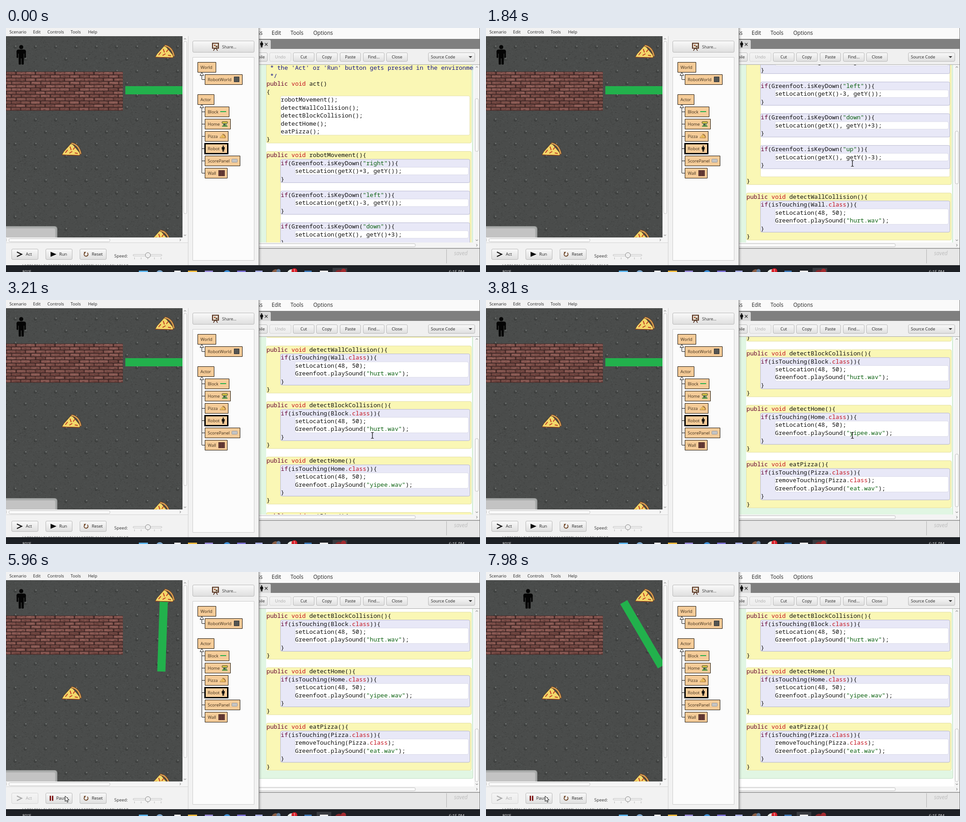
Write an HTML page with a canvas that moves like this. It is 1042x537 px and loops after 8000 ms.

```html
<!DOCTYPE html>
<html lang="en">
<head>
<meta charset="utf-8">
<title>Robot scenario</title>
<style>
html, body { margin: 0; width: 100%; height: 100%; overflow: hidden; background: #f1f1f1; }
canvas { display: block; }
</style>
</head>
<body>
<canvas id="stage" width="1042" height="537"></canvas>
<script>
const W = 1042, H = 537, LOOP = 8000;
const view = document.getElementById('stage').getContext('2d');
const UI = '"Open Sans", "Noto Sans", sans-serif';
const MONO = '500 13.05px "Noto Sans Mono", "DejaVu Sans Mono", monospace';
const CHAR = 7.83, LINE = 17.45;
let g = view;

// ---------- helpers ----------
function rng(seed) {
  return () => {
    seed = (seed * 1664525 + 1013904223) >>> 0;
    return seed / 4294967296;
  };
}
function rect(x, y, w, h, fill) {
  g.fillStyle = fill;
  g.fillRect(x, y, w, h);
}
function box(x, y, w, h, r, fill, stroke, lw = 1) {
  g.beginPath();
  g.roundRect(x, y, w, h, r);
  if (fill) { g.fillStyle = fill; g.fill(); }
  if (stroke) { g.strokeStyle = stroke; g.lineWidth = lw; g.stroke(); }
}
function disc(x, y, r, fill, stroke) {
  g.beginPath();
  g.arc(x, y, r, 0, 7);
  if (fill) { g.fillStyle = fill; g.fill(); }
  if (stroke) { g.strokeStyle = stroke; g.lineWidth = 1; g.stroke(); }
}
function path(pts, fill, stroke, lw = 1, close = true) {
  g.beginPath();
  pts.forEach(([x, y], i) => i ? g.lineTo(x, y) : g.moveTo(x, y));
  if (close) g.closePath();
  if (fill) { g.fillStyle = fill; g.fill(); }
  if (stroke) { g.strokeStyle = stroke; g.lineWidth = lw; g.stroke(); }
}
const line = (pts, color, lw = 1) => path(pts, null, color, lw, false);
function clipped(x, y, w, h, paint) {
  g.save();
  g.beginPath();
  g.rect(x, y, w, h);
  g.clip();
  paint();
  g.restore();
}
function text(s, x, cy, size = 9.4, color = '#222', align = 'left', style = '') {
  g.font = `${style} ${size}px ${UI}`;
  g.fillStyle = color;
  g.textAlign = align;
  g.fillText(s, x, cy + size * 0.36);
}
function button(x, y, w, h, dim) {
  const grad = g.createLinearGradient(0, y, 0, y + h);
  grad.addColorStop(0, dim ? '#f4f4f4' : '#fafafa');
  grad.addColorStop(1, dim ? '#ececec' : '#dedede');
  box(x + 0.5, y + 0.5, w - 1, h - 1, 2.5, grad, dim ? '#d6d6d6' : '#b9b9b9');
}
function chevron(x, y, dx, dy) {
  line([[x - dx - dy * 2.5, y - dy - dx * 2.5], [x + dx, y + dy], [x - dx + dy * 2.5, y - dy + dx * 2.5]], '#666');
}
function cached(draw) {
  const c = document.createElement('canvas');
  c.width = W; c.height = H;
  g = c.getContext('2d');
  draw();
  g = view;
  return c;
}

// ---------- sprites ----------
function person(x, y, k = 1) {
  g.save();
  g.translate(x, y);
  g.scale(k, k);
  disc(0, -17, 4.5, '#050505');
  box(-10.2, -11.5, 20.4, 9, 4, '#050505');
  box(-10.2, -9, 3.6, 16, 1.8, '#050505');
  box(6.6, -9, 3.6, 16, 1.8, '#050505');
  rect(-5.6, -11, 11.2, 19, '#050505');
  box(-5.6, 2, 5, 19.5, 1.5, '#050505');
  box(0.6, 2, 5, 19.5, 1.5, '#050505');
  g.restore();
}
function pizza(x, y, k = 1) {
  g.save();
  g.translate(x, y);
  g.scale(k, k);
  path([[0, 28], [4, 21], [21, 2], [41, 26], [38, 29.5]], '#f3d76a', '#5a3216', 0.9);
  g.lineCap = 'round';
  for (const [a, b, c, d] of [[8, 23, 12, 18], [17, 24, 22, 21], [18, 11, 20, 17], [25, 16, 28, 12], [29, 24, 34, 25]])
    line([[a, b], [c, d]], '#c23a22', 2);
  const crust = (color, lw) => {
    g.beginPath();
    g.moveTo(22, 3);
    g.quadraticCurveTo(37, 6, 41, 25);
    g.strokeStyle = color;
    g.lineWidth = lw;
    g.stroke();
  };
  crust('#5a3216', 4.6);
  crust('#d39a52', 3);
  line([[1, 28.4], [39, 29.3]], '#8c3a1c', 1.3);
  g.restore();
}
function floor() {
  const rnd = rng(7);
  rect(0, 18, 388, 443, '#4a4c4b');
  for (let i = 0; i < 12000; i++)
    rect(rnd() * 388, 18 + rnd() * 443, 1 + rnd() * 2, 1, rnd() < 0.5 ? 'rgba(20,22,22,.15)' : 'rgba(140,145,143,.11)');
  for (let k = 0; k < 17; k++) {
    for (let n = -2; n < 9; n++) {
      const x = 65 + n * 44.6 + (k % 2 ? 22.3 : 0), y = 41 + k * 26.75;
      disc(x - 0.4, y + 0.8, 3.4, 'rgba(30,32,31,.4)');
      disc(x, y, 2.6, '#505352');
      disc(x - 0.6, y + 0.5, 1.5, '#3d3f3e');
      disc(x + 0.9, y - 1.1, 1.2, '#7d807e');
    }
  }
}
function wall() {
  const rows = 12, perTile = 4, tile = 257 / 3, rh = 86 / rows, bw = tile / perTile;
  rect(0, 96, 257, 86, '#412927');
  for (let t = -1; t < 3; t++) {
    const rnd = rng(21);
    for (let r = 0; r < rows; r++) {
      for (let b = 0; b < perTile; b++) {
        const v = rnd(), x = t * tile + b * bw + (r % 2) * bw / 2 + rnd() * 2, y = 96 + r * rh;
        box(x + 0.6, y + 1, bw - 1.8, rh - 2, 1, `rgb(${108 + v * 34},${66 + v * 26},${61 + v * 25})`);
        rect(x + 1.5, y + 1.2, bw - 5, 1, 'rgba(185,135,125,.35)');
        for (let i = 0; i < 5; i++)
          rect(x + 1 + rnd() * (bw - 6), y + 1.5 + rnd() * (rh - 3.5), 2 + rnd() * 3, 1, rnd() < 0.5 ? 'rgba(45,25,24,.28)' : 'rgba(195,145,135,.24)');
      }
    }
  }
}

// ---------- still layers ----------
function classBox(name, x, y, w, h, bold) {
  box(x + 0.5, y + 0.5, w - 1, h - 1, 0, '#f5cc99', '#1a1208', 1);
  if (bold) box(x + 0.5, y + 0.5, w - 1, h - 1, 0, null, '#000', 3);
  text(name, x + 6.5, y + h / 2 + 0.2, 9.4, '#3a2a18');
}
function inherit(y, branches) {
  const end = branches[branches.length - 1];
  line([[430.5, y + 7], [430.5, end + 0.5]], '#111');
  for (const b of branches) line([[431, b + 0.5], [438, b + 0.5]], '#111');
  path([[430.5, y], [434.5, y + 7], [426.5, y + 7]], '#fff', '#111');
}
function classPanel() {
  button(410, 28, 136, 26);
  box(454, 33.5, 13, 11, 0, '#e9e2d6', '#54301d', 2.2);
  disc(459, 38.5, 1.8, '#a8552b');
  rect(461, 39, 4, 3.5, '#6d5a45');
  line([[456, 50], [459, 45], [462, 45], [465, 50]], '#54301d', 1.6);
  text('Share...', 475, 41.5, 9.1, '#333');
  box(410.5, 64.5, 135, 447, 0, '#fcfcfc', '#cccccc');

  inherit(97.5, [113]);
  inherit(168.5, [184, 211, 238, 265, 292, 319]);
  classBox('World', 421, 75, 41, 23);
  classBox('RobotWorld', 437, 102, 83, 23);
  classBox('Actor', 421, 146, 37, 23);
  classBox('Block', 437, 173, 54, 23);
  classBox('Home', 437, 200, 57, 23);
  classBox('Pizza', 437, 227, 52, 23);
  classBox('Robot', 437, 254, 51, 23, true);
  classBox('ScorePanel', 437, 281, 78, 23);
  classBox('Wall', 437, 308, 50, 23);

  box(501.5, 107.5, 11, 11, 0, '#535553', '#333');
  rect(471, 183, 13, 2, '#22b14c');
  box(475, 206, 12, 4, 1, '#e5cf45', '#39422a');
  rect(477, 210, 8, 5, '#78966c');
  rect(475, 215, 12, 2, '#3e8f35');
  rect(479, 211, 2, 3, '#26332a');
  pizza(470, 233, 0.31);
  person(477.5, 265.5, 0.31);
  box(496.5, 288.5, 12, 7, 1, '#c4c4c4', '#9c9c9c');
  rect(467, 313, 14, 13, '#4a2a27');
  for (let i = 0; i < 12; i++) rect(468 + (i % 3) * 4.4, 314 + (i / 3 | 0) * 3.1, 3.4, 2, '#784640');
}
function leftWindow() {
  rect(0, 0, 556, 522, '#f2f2f2');
  for (const [s, x] of [['Scenario', 7.5], ['Edit', 59.5], ['Controls', 91], ['Tools', 142], ['Help', 180.5]]) text(s, x, 8.3, 9.3);
  rect(389, 18, 11, 454, '#f5f5f5');
  box(390.5, 29.5, 7, 379, 3, '#fafafa', '#c3c3c3');
  chevron(393.5, 24, 0, -1);
  chevron(393.5, 456, 0, 1);
  rect(0, 461, 389, 11, '#f5f5f5');
  box(6.5, 463.5, 222, 7, 3, '#fafafa', '#c3c3c3');
  chevron(0, 466.5, -1, 0);
  chevron(383, 466.5, 1, 0);
  rect(0, 472, 400, 1, '#d6d6d6');
  rect(400, 18, 1, 504, '#d0d0d0');
  classPanel();

  button(162, 486, 59, 24);
  g.beginPath();
  g.arc(176, 498, 4.3, -0.9, 3.9);
  g.strokeStyle = '#6b3f1f';
  g.lineWidth = 1.8;
  g.stroke();
  path([[171, 493], [176, 492.5], [173, 497]], '#6b3f1f');
  text('Reset', 188.5, 498, 9.4);
  text('Speed:', 238, 501.5, 9.4, '#333');
  box(279.5, 498.5, 63, 3, 1.5, '#fff', '#b8b8b8');
  for (let i = 0; i < 5; i++) rect(282 + i * 14.6, 505, 1, 4, '#b5b5b5');
  disc(312, 500, 5.7, '#efefef', '#888');
}
function toolButton(s, x, w, dim) {
  button(x, 54, w, 20, dim);
  text(s, x + w / 2, 64, 9.2, dim ? '#aaa' : '#222', 'center');
}
function rightWindow() {
  rect(556, 0, 486, 25, '#fafafa');
  text('ss', 553, 10.8, 11.7);
  text('Edit', 584, 10.8, 11.7);
  text('Tools', 625.5, 10.8, 11.7);
  text('Options', 675.5, 10.8, 11.7);
  rect(556, 24, 486, 22, '#7f7f7f');
  box(550, 26, 32, 22, 3, '#d9d9d9');
  person(562, 36, 0.31);
  line([[569, 33], [575, 39]], '#333', 1.2);
  line([[575, 33], [569, 39]], '#333', 1.2);
  rect(556, 46, 486, 35, '#f0f0f0');
  button(540, 54, 35, 20);
  text('pile', 553.5, 64, 9.2);
  toolButton('Undo', 579, 48, true);
  toolButton('Cut', 631, 47);
  toolButton('Copy', 682, 47);
  toolButton('Paste', 734, 46);
  toolButton('Find...', 785, 47);
  toolButton('Close', 836, 47);
  button(928, 54, 103, 20);
  text('Source Code', 934, 64, 9.1);
  path([[1017, 62], [1025, 62], [1021, 66]], '#333');
  rect(556, 80, 486, 1, '#a9a9a9');
  rect(556, 81, 486, 392, '#fff');
  rect(1029, 81, 13, 404, '#f4f4f4');
  chevron(1035, 86, 0, -1);
  chevron(1035, 467, 0, 1);
  rect(556, 472, 486, 13, '#f4f4f4');
  box(540, 474.5, 360, 7, 3, '#fafafa', '#c0c0c0');
  chevron(1035, 478, 1, 0);
  rect(556, 485, 486, 37, '#e7e7e7');
  rect(556, 484, 486, 2, '#a2a2a2');
  rect(968, 487, 1, 31, '#b2b2b2');
  text('saved', 985, 495.5, 11.8, '#bdbdbd', 'left', 'italic');
  rect(1041, 0, 1, 522, '#777');
}
const world = cached(() => clipped(0, 18, 388, 443, () => {
  floor();
  clipped(0, 96, 257, 86, wall);
}));
const chrome = cached(() => {
  rightWindow();
  leftWindow();
  for (let i = 0, r = rng(3); i < 45; i++) rect(36 + i * 5.2, 520, 1 + r() * 3, 1.5, 'rgba(60,60,60,.5)');
});

// ---------- editor ----------
const moves = [['right', 'getX()+3, getY()'], ['left', 'getX()-3, getY()'], ['down', 'getX(), getY()+3'], ['up', 'getX(), getY()-3']];
const touch = (fn, cls, act, wav) => [
  '', `public void ${fn}(){`, `    if(isTouching(${cls}.class)){`,
  `        ${act};`, `        Greenfoot.playSound("${wav}.wav");`, '    }', '}'];
const HOME = 'setLocation(48, 50)';
const code = [
  " * the 'Act' or 'Run' button gets pressed in the environment.", ' */', 'public void act()', '{',
  ...['robotMovement', 'detectWallCollision', 'detectBlockCollision', 'detectHome', 'eatPizza'].map(s => `    ${s}();`),
  '}', '', 'public void robotMovement(){',
  ...moves.flatMap(([k, a]) => [`    if(Greenfoot.isKeyDown("${k}")){`, `        setLocation(${a});`, '    }', '']),
  '}',
  ...touch('detectWallCollision', 'Wall', HOME, 'hurt'),
  ...touch('detectBlockCollision', 'Block', HOME, 'hurt'),
  ...touch('detectHome', 'Home', HOME, 'yipee'),
  ...touch('eatPizza', 'Pizza', 'removeTouching(Pizza.class)', 'eat')];

// Scope boxes follow from the braces
const scopes = [];
let open = -3;
code.forEach((s, i) => {
  if (s.startsWith('public') && i > 2) open = i;
  if (s === '}') scopes.push({ a: open, b: i, body: open < 0 ? 4 : open + 1, depth: 0 });
});
code.forEach((s, i) => {
  if (s.startsWith('    if')) scopes.push({ a: i, b: code.indexOf('    }', i), body: i + 1, depth: 1 });
});

function inkOf(tok) {
  if (tok[0] === '"') return '#0a6010';
  if (tok === 'public' || tok === 'if') return '#660033';
  if (tok === 'void' || tok === 'class') return '#c4101c';
  return '#101010';
}
function codeLine(s, cy, comment) {
  g.font = MONO;
  g.textAlign = 'left';
  for (const m of comment ? [{ 0: s, index: 0 }] : s.matchAll(/"[^"]*"|\w+|[^\w\s"]+/g)) {
    g.fillStyle = comment ? '#14148c' : inkOf(m[0]);
    g.fillText(m[0], 572.8 + m.index * CHAR, cy + 4.4);
  }
}
function editor(scroll) {
  const top = i => 79.3 + i * LINE - scroll;
  clipped(557, 81, 471, 391, () => {
    rect(557, 60, 470, top(code.length + 1) - 60, '#e1f6e3');
    box(540, 40, 486.5, top(code.length + 1) - 40, 3, null, '#c3dec6');
    rect(572, 60, 452, top(code.length) - 60, '#fff');
    for (const { a, b, body, depth } of scopes) {
      const y = top(a), h = top(b + 1) - y, by = top(body), bh = top(b) - by;
      if (depth) {
        box(603.5, y + 0.3, 416, h - 1, 3, '#e8e8f7', '#b9b9d2');
        box(635.5, by + 0.3, 381, bh - 0.8, 3, '#fff', '#d9d9e8');
      } else {
        box(572.5, y + 0.3, 450.5, h - 1, 3, '#faf7b5', '#e3dfa2');
        box(603.5, by + 0.3, 416, bh - 0.8, 3, '#fff', '#e5e2b4');
      }
    }
    code.forEach((s, i) => {
      const y = top(i);
      if (y > 55 && y < 480) codeLine(s, y + LINE / 2, i < 2);
    });
  });
  box(1031.5, 155.5 + scroll * 0.298, 7, 116, 3, '#fafafa', '#bdbdbd');
}

// ---------- motion ----------
const scrolls = [
  [900, 44], [970, 87], [1040, 131], [1440, 153], [1580, 197], [1770, 240], [1870, 284], [1970, 328],
  [2260, 371], [2310, 393], [2720, 437], [3210, 502], [3270, 524], [3360, 546], [3450, 568], [3540, 590],
  [3810, 616], [3870, 637]];
const STEP = 66.7;
const scrollAt = t => scrolls.reduce((v, [at, y]) => t >= at ? y : v, 0);

// The game repaints about fifteen times a second
function gameTime(t) {
  if (t >= 6110) return 6110 + Math.floor((t - 6110) / STEP) * STEP;
  if (t >= 5960) return t >= 6060 ? 6060 : 5960;
  return 5960 - Math.ceil((5960 - t) / STEP) * STEP;
}
function pointerAt(t) {
  if (t < 250) return null;
  if (t < 310) return [1019, 512];
  if (t < 380) return [905, 398];
  if (t < 640) return [806, 299];
  if (t < 3870) return [805.5, 298];
  if (t < 4330) return [780, 304];
  const s = 4860 + Math.floor((t - 4860) / STEP) * STEP;
  if (s < 4860) {
    const p = Math.max(0, (s - 4270) / 590), e = p * p * (3 - 2 * p);
    return [780 - 646 * e, 304 + 179 * e];
  }
  const p = Math.min(1, (s - 4860) / 240);
  return [134 - 4 * p, 483 + 10 * p];
}
function pointer(t) {
  const pos = pointerAt(t);
  if (!pos) return;
  const [x, y] = pos;
  if (x > 557 && y < 472) {
    for (const d of [-1, 1])
      line([[-3, 6.5], [-1, 6.5], [0, 5.5], [1, 6.5], [3, 6.5]].map(([a, b]) => [x + a, y + b * d]), '#111', 1.2);
    line([[x, y - 5.5], [x, y + 5.5]], '#111', 1.3);
  } else {
    path([[0, 0], [0, 12], [2.8, 9.4], [4.7, 13.8], [6.6, 13], [4.8, 8.8], [8.6, 8.6]].map(([a, b]) => [x + a, y + b]), '#fff', '#111');
  }
}
function scene(t) {
  const s = gameTime(t);
  g.drawImage(world, 0, 0);
  clipped(0, 18, 388, 443, () => {
    g.save();
    g.translate(344.3, 137);
    g.rotate(Math.max(0, 92 + 0.1624 * (s - 5960)) * Math.PI / 180);
    rect(-82, -9, 164, 18, '#22b14c');
    g.restore();
    pizza(328, 36);
    pizza(123, 251);
    pizza(318, 443);
    box(-20, 436, 133, 60, 6, '#8f9190');
    box(-20, 437, 131.5, 60, 5, '#aaacab');
    box(-20, 441, 128, 60, 3, '#c3c3c3');
    person(33.5 + Math.max(0, (s - 7306) * 0.0878), 59);
  });
}
function controls(running) {
  button(12, 486, 59, 24, running);
  line([[24, 493], [34.5, 498], [24, 503]], running ? '#aaa' : '#111', 2.2);
  text('Act', 43.5, 498, 9.3, running ? '#aaa' : '#222');
  button(87, 486, 59, 24);
  if (running) {
    rect(96, 492.5, 3, 11, '#7c1414');
    rect(101, 492.5, 3, 11, '#7c1414');
    text('Pause', 110.5, 498, 9.3);
  } else {
    path([[98, 492.5], [111, 498], [98, 503.5]], '#0a0a0a');
    text('Run', 117, 498, 9.3);
  }
}
function taskbar(active) {
  rect(0, 522, W, 15, '#1d2025');
  rect(active ? 683 : 718, 528, 32, 9, '#383b40');
  const icons = [
    [292, 20, '#5db4ec'], [370, 14, '#f2f2f2'], [400, 20, '#eeb93f'], [437, 18, '#9a8bd8'], [508, 19, '#7b6fd0'],
    [548, 16, '#a9aee6'], [656, 16, '#3d78b8'], [690, 18, '#ececec']];
  for (const [x, w, c] of icons) rect(x, 534, w, 3, c);
  disc(338, 541, 8, '#7fa9cf');
  disc(486, 541, 8, '#3f8fd8');
  disc(593, 540, 9, '#8a5d45');
  disc(599, 535, 4.5, '#62809f');
  disc(628, 541, 10, '#e7efe8');
  disc(634, 535, 6.3, '#d9202a');
  text('1', 634, 535, 9, '#fff', 'center');
  disc(732, 541, 9, '#85272b');
  disc(742, 535, 5.5, '#a32b30');
  text('80°F', 36, 537, 9.2, '#eee');
  text('6:15 PM', 973.5, 536.5, 9.2, '#eee');
}
function draw(t) {
  g.drawImage(chrome, 0, 0);
  scene(t);
  editor(scrollAt(t));
  controls(t >= 5327);
  const shade = g.createLinearGradient(556, 0, 562, 0);
  shade.addColorStop(0, 'rgba(0,0,0,.22)');
  shade.addColorStop(1, 'rgba(0,0,0,0)');
  rect(556, 0, 6, 522, shade);
  rect(555.5, 0, 1, 522, '#777');
  taskbar(t >= 5260);
  pointer(t);
}
const start = performance.now();
function frame() {
  draw((performance.now() - start) % LOOP);
  requestAnimationFrame(frame);
}
frame();
</script>
</body>
</html>
```
